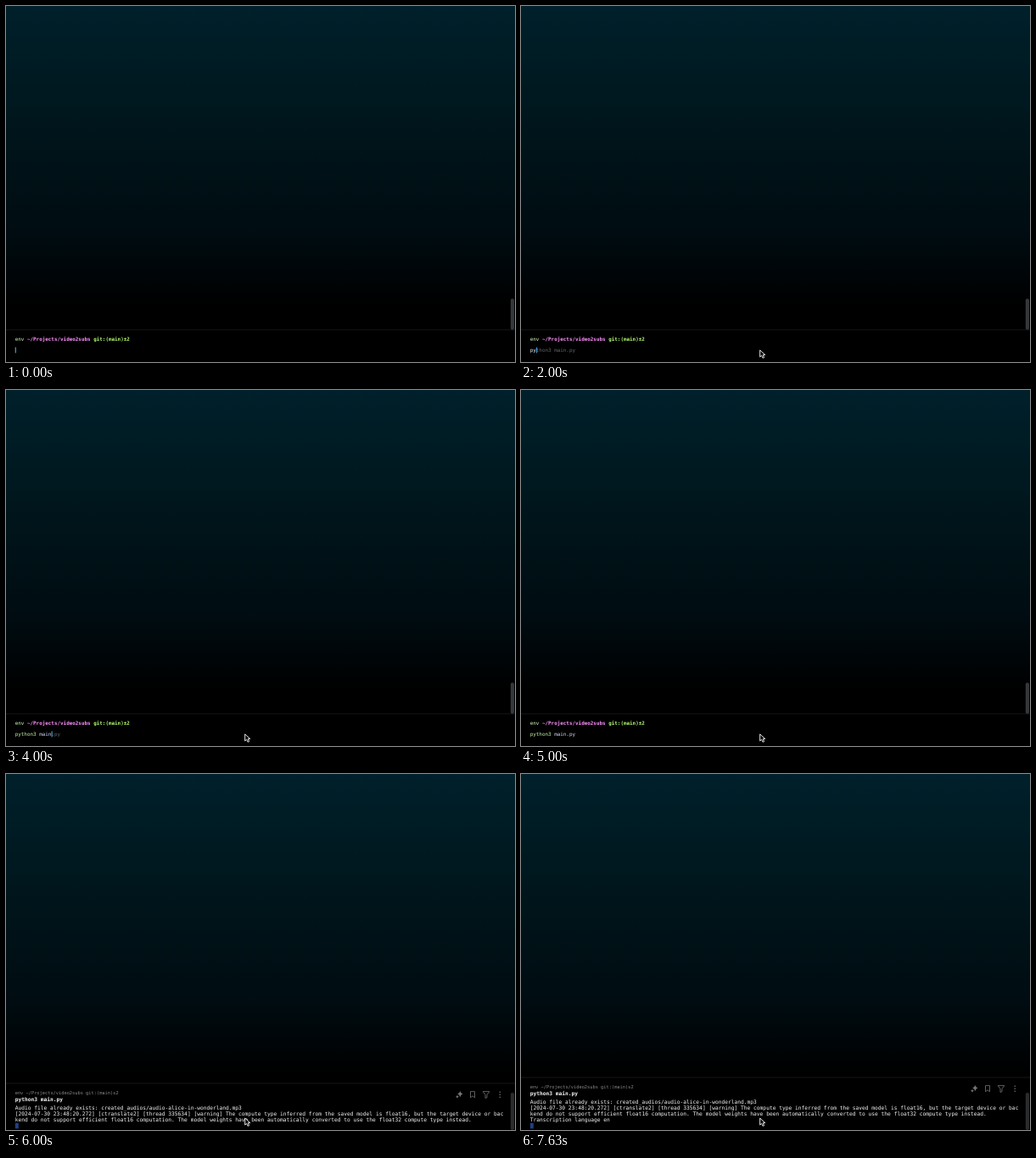
An HTML page that plays this animation: 600 px wide and 420 px high, repeating every 8 s.

```html
<!DOCTYPE html>
<html lang="en">
<head>
<meta charset="utf-8">
<title>Terminal session</title>
<style>
  html, body { margin: 0; width: 100%; height: 100%; overflow: hidden; background: #000; }
  svg { display: block; width: 600px; height: 420px; }
  text {
    font-family: "DejaVu Sans Mono", "Liberation Mono", monospace;
    white-space: pre;
    text-rendering: geometricPrecision;
  }
  .input { font-size: 5.92px; }
  .output { font-size: 6.253px; fill: #f6f6f6; }
  .header { font-size: 5.335px; fill: #8b8b8b; }
  .bold { font-weight: bold; }
  .rule { fill: #12171a; }
  .icons { fill: none; stroke: #747779; stroke-width: .8; stroke-linejoin: round; }
  .icons .solid { fill: #747779; stroke: none; }
</style>
</head>
<body>
<svg viewBox="0 0 600 420">
  <defs>
    <linearGradient id="sky" x1="0" y1="0" x2="0" y2="1">
      <stop offset="0" stop-color="#00202b"/>
      <stop offset=".33" stop-color="#00161c"/>
      <stop offset=".64" stop-color="#000c11"/>
      <stop offset=".84" stop-color="#000"/>
    </linearGradient>
  </defs>
  <rect width="600" height="420" fill="url(#sky)"/>

  <g id="editor">
    <rect class="rule" y="381.5" width="600" height="1"/>
    <text class="input" x="10.7" y="395"><tspan fill="#d5ffc0">env </tspan><tspan class="bold" fill="#ff8ffd">~/Projects/video2subs </tspan><tspan class="bold" fill="#b4fa72">git:(main)±2</tspan></text>
    <text class="input" x="10.7" y="407.8"><tspan id="command"></tspan><tspan id="argument" fill="#d4d7fb"></tspan><tspan id="hint" fill="#62666a"></tspan></text>
    <rect id="caret" y="402.6" width="1.3" height="6.8" fill="#3c8fc0"/>
  </g>

  <g id="block">
    <rect class="rule" y="385.5" width="600" height="1"/>
    <text class="header" x="10.7" y="399">env ~/Projects/video2subs git:(main)±2</text>
    <text class="output bold" x="10.7" y="406.6">python3 main.py</text>
    <g id="lines"></g>
    <g class="icons" transform="translate(0 399)">
      <path class="solid" d="M535.3 -4q.6 3 3 3.6q-2.4.6-3 3.6q-.6-3-3-3.6q2.4-.6 3-3.6zM532 .8q.3 1.7 1.8 2q-1.5.4-1.8 2q-.4-1.6-1.8-2q1.4-.3 1.8-2z"/>
      <path d="M547.5 -3.4h5v7.2l-2.5-2l-2.5 2z"/>
      <path d="M562.2 -3.4h7.6l-2.8 3.8v3.2l-2 .9v-4.1z"/>
      <g class="solid">
        <circle cx="582.2" cy="-2.8" r=".8"/>
        <circle cx="582.2" cy=".2" r=".8"/>
        <circle cx="582.2" cy="3.2" r=".8"/>
      </g>
    </g>
  </g>
  <rect id="blockCaret" x="10.8" y="411.7" width="4" height="6.6" fill="#203f84"/>
  <rect id="scrollbar" x="594.8" width="4.2" rx="2"/>
  <path id="pointer" d="M0 0v8l1.9-1.7l1.4 3l1.6-.7l-1.4-2.9h2.6z" fill="#000" stroke="#fff" stroke-width=".9" stroke-linejoin="round"/>
</svg>
<script>
const LOOP = 8000, RUN = 5130;
const LEFT = 10.7, CHAR = 3.564, LINE = 7;
const COMMAND = "python3 main.py", NAME_LENGTH = 7;

// [time, characters typed]
const KEYS = [[0, 0], [1750, 1], [1880, 2], [2130, 3], [2380, 4], [2500, 6], [2630, 7],
  [2880, 8], [3000, 9], [3130, 10], [3750, 11], [3880, 12], [4380, 13], [4500, 14], [4630, 15]];
// [time, output lines shown]
const PRINTS = [[0, 0], [5500, 1], [5750, 3], [6380, 4]];
// [from, to] while the input caret is hidden
const CARET_OFF = [[250, 750], [1250, 1750], [3500, 3750], [5000, RUN]];
const OUTPUT = [
  "Audio file already exists: created_audios/audio-alice-in-wonderland.mp3",
  "[2024-07-30 23:48:20.272] [ctranslate2] [thread 335634] [warning] The compute type inferred from the saved model is float16, but the target device or bac",
  "kend do not support efficient float16 computation. The model weights have been automatically converted to use the float32 compute type instead.",
  "Transcription language en"
];

const $ = id => document.getElementById(id);
const at = (steps, t) => steps.findLast(([start]) => t >= start)[1];
const show = (id, on) => $(id).setAttribute("visibility", on ? "visible" : "hidden");
const set = (id, attrs) => {
  for (const [name, value] of Object.entries(attrs)) $(id).setAttribute(name, value);
};

const rows = OUTPUT.map((line, i) => {
  const row = document.createElementNS("http://www.w3.org/2000/svg", "text");
  row.setAttribute("class", "output");
  row.setAttribute("x", LEFT);
  row.setAttribute("y", 417 + i * LINE);
  row.textContent = line;
  return $("lines").appendChild(row);
});

function drawInput(t) {
  const typed = at(KEYS, t);
  $("command").textContent = COMMAND.slice(0, Math.min(typed, NAME_LENGTH));
  $("argument").textContent = COMMAND.slice(NAME_LENGTH, Math.max(typed, NAME_LENGTH));
  $("hint").textContent = typed ? COMMAND.slice(typed) : "";
  set("command", { fill: typed < NAME_LENGTH ? "#f2f2f2" : "#c8f5a8" });
  set("caret", { x: LEFT + typed * CHAR });
  show("caret", t < RUN && !CARET_OFF.some(([from, to]) => t >= from && t < to));
}

function drawOutput(t) {
  const count = at(PRINTS, t);
  rows.forEach((row, i) => { row.style.display = i < count ? "" : "none"; });
  set("block", { transform: `translate(0 ${-LINE * count})` });
}

function drawPointer(t) {
  const rest = 1 - Math.min(1, Math.max(0, (t - 130) / 620));
  const drift = rest * rest;
  set("pointer", { transform: `translate(${281.7 + 40 * drift} ${406 - 4 * drift})` });
  show("pointer", t >= 130);
}

function draw(now) {
  const t = now % LOOP, running = t >= RUN;
  show("editor", !running);
  show("block", running);
  show("blockCaret", running);
  set("scrollbar", running
    ? { y: 376, height: 44, fill: "#292b2c" }
    : { y: 345.3, height: 36.7, fill: "#35383a" });
  drawInput(t);
  drawOutput(t);
  drawPointer(t);
}

const start = performance.now();
function tick() {
  draw(performance.now() - start);
  requestAnimationFrame(tick);
}
tick();
</script>
</body>
</html>
```
